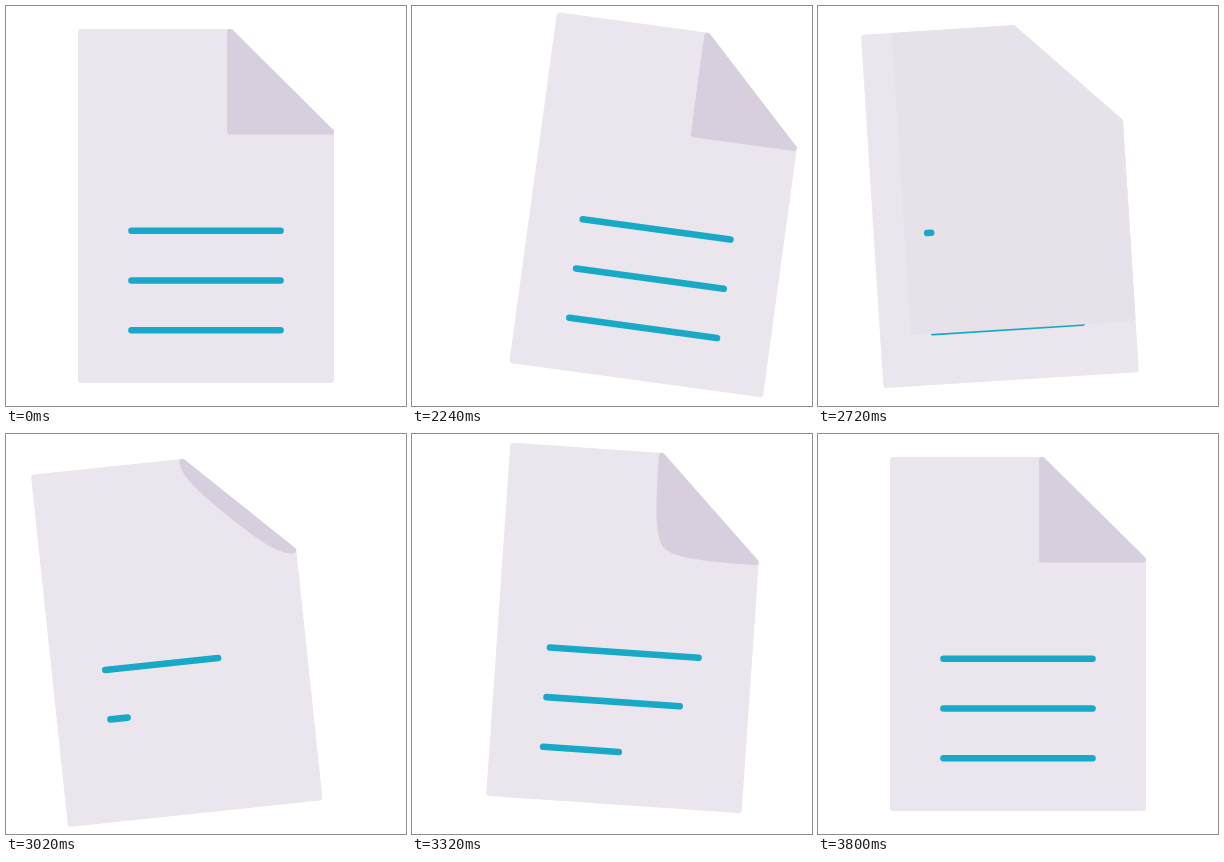
An HTML page with a canvas for the animation above (3830 ms loop, 400 px wide and 400 px high).

```html
<!DOCTYPE html>
<html lang="en">
<head>
<meta charset="utf-8">
<title>Turning page</title>
<style>
html, body { margin: 0; width: 100%; height: 100%; overflow: hidden; background: #fff; }
canvas { display: block; width: 100vmin; height: 100vmin; }
</style>
</head>
<body>
<canvas id="stage" width="400" height="400"></canvas>
<script>
const ctx = document.getElementById('stage').getContext('2d');
const LOOP = 3830, STEP = 30, DRAW_TIME = 526;
const PAPER = [235, 230, 237], FOLD = [215, 207, 221], INK = [23, 169, 199];
const ROW_STARTS = [2665, 2904, 3054];

const mix = (a, b, k) => a + (b - a) * k;
const rgb = c => `rgb(${c.map(Math.round).join()})`;

function ease(t, start, end) {
  const k = Math.min(1, Math.max(0, (t - start) / (end - start)));
  return (1 - Math.cos(Math.PI * k)) / 2;
}

// Eased swing from rest through [time, value] turning points
function swing(t, start, ...turns) {
  let value = 0;
  for (const [time, next] of turns) {
    value = mix(value, next, ease(t, start, time));
    start = time;
  }
  return value;
}

// Fill with a round outline, which softens the corners
function paint(path, color, width = 6) {
  ctx.fillStyle = ctx.strokeStyle = rgb(color);
  ctx.lineWidth = width;
  ctx.fill(path);
  ctx.stroke(path);
}

function sheet(left, bottom, color) {
  paint(new Path2D(`M${left} 26H224.4L325 125.8V${bottom}H${left}Z`), color);
}

function row(i, k) {
  if (k <= 0) return;
  const y = 224.8 + i * 49.7;
  ctx.strokeStyle = rgb(INK);
  ctx.lineWidth = 6.6;
  ctx.beginPath();
  ctx.moveTo(125.5, y);
  ctx.lineTo(mix(125.5, 274.5, k), y);
  ctx.stroke();
}

function curl(k) {
  if (k <= 0) return;
  const x = mix(274.5, 224, k), y = mix(76, 125.5, k);
  const bend = 40 * (1 - k), reach = 70 * k;
  const path = new Path2D();
  path.moveTo(224, 26);
  path.bezierCurveTo(224, 26 + reach, x - bend, y - bend, x, y);
  path.bezierCurveTo(x + bend, y + bend, 325 - reach, 125.5, 325, 125.5);
  path.closePath();
  paint(path, FOLD, Math.min(6, k * 40));
}

function draw(t) {
  const x = swing(t, 2000, [2300, 53], [2900, -36.5], [3400, 17.3], [3800, 0]);
  const y = swing(t, 2080, [2560, -4.7], [3020, 3.5], [3400, -7.2], [3800, 0]);
  const tilt = swing(t, 2000, [2340, 9.7], [2900, -7.7], [3400, 4.7], [3800, 0]);

  ctx.setTransform(1, 0, 0, 1, 0, 0);
  ctx.fillStyle = '#fff';
  ctx.fillRect(0, 0, 400, 400);
  ctx.lineCap = ctx.lineJoin = 'round';
  ctx.translate(200 + x, 200 + y);
  ctx.rotate(tilt * Math.PI / 180);
  ctx.translate(-200, -200);

  sheet(75, 374, PAPER);
  if (t < 2900) {
    // The folded corner grows into the next blank page
    ROW_STARTS.forEach((_, i) => row(i, 1));
    const k = ease(t, 2300, 2900);
    sheet(mix(224, 75, k), mix(125.5, 374, k), FOLD.map((c, i) => mix(c, PAPER[i], k)));
  }
  curl(ease(t, 2850, 3520));
  ROW_STARTS.forEach((start, i) => row(i, ease(t, start, start + DRAW_TIME)));
}

const begin = performance.now();
function tick() {
  const t = (performance.now() - begin) % LOOP;
  draw(Math.floor((t - 20) / STEP) * STEP + 20);
  requestAnimationFrame(tick);
}
tick();
</script>
</body>
</html>
```
